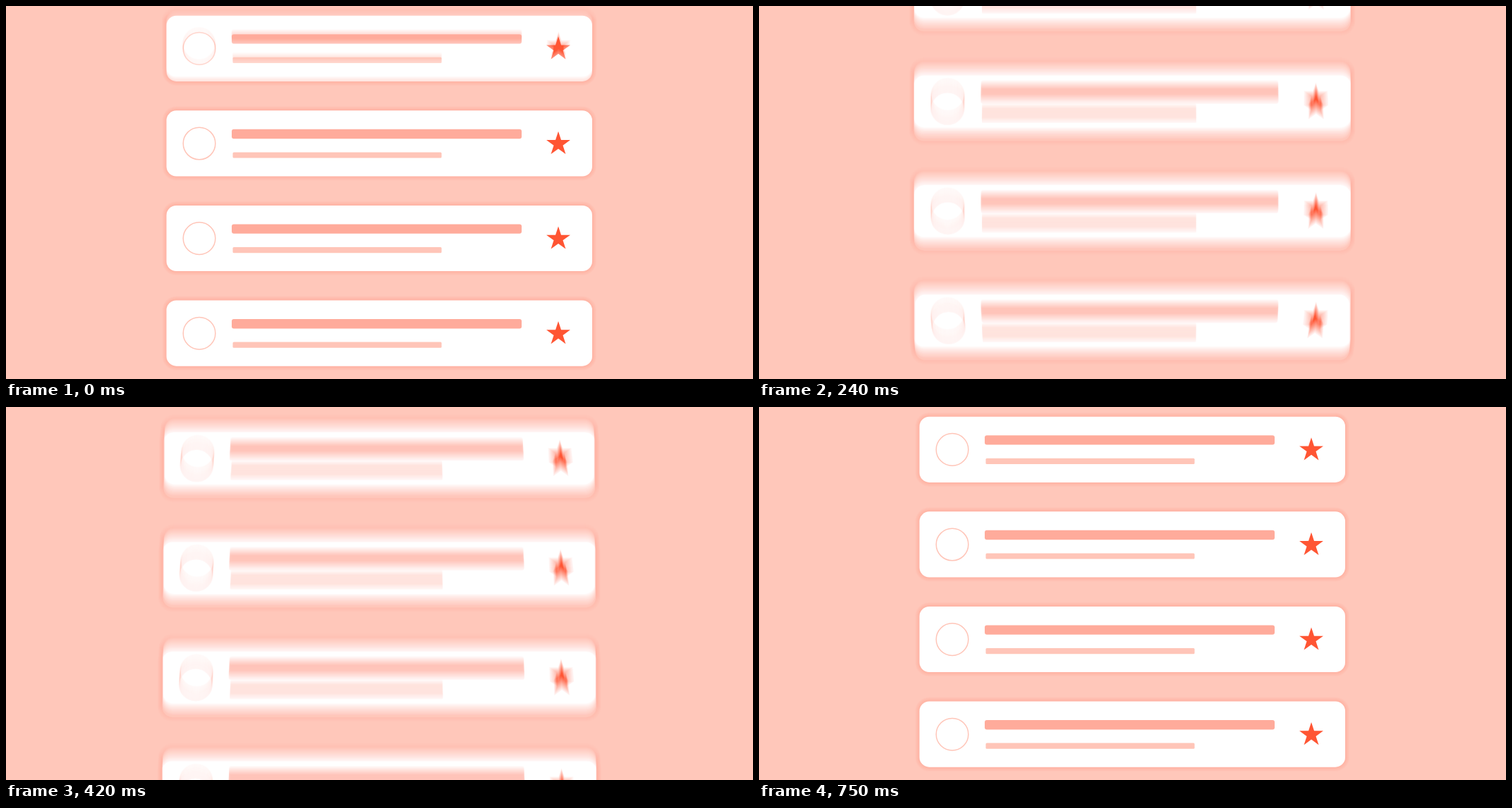
An HTML page with a canvas that plays this animation: 1059 px wide and 529 px high, repeating every 1320 ms.

```html
<!DOCTYPE html>
<html lang="en">
<head>
<meta charset="utf-8">
<title>Staggered list</title>
<style>
  html, body { margin: 0; width: 100%; height: 100%; overflow: hidden; background: #ffc7ba; }
  canvas { display: block; }
</style>
</head>
<body>
<canvas id="stage" width="1059" height="529"></canvas>
<script>
const W = 1059, H = 529, MID = 529.3;
const LOOP = 1320, STEP = 30, LAST = 750;
const PITCH = 134.6, TRAVEL = 388, STAGGER = 60;
const SHUTTER = 60, SAMPLES = 21;
const STRETCH = 0.0265;

const stage = document.getElementById('stage').getContext('2d');
const layer = document.createElement('canvas');
layer.width = W;
layer.height = H;
const pen = layer.getContext('2d');

const clamp = x => Math.min(1, Math.max(0, x));
const progress = (t, from, to) => clamp((t - from) / (to - from));
const ease = x => (1 - Math.cos(Math.PI * x)) / 2;

function box(x, y, w, h, r, color) {
  pen.fillStyle = color;
  pen.beginPath();
  pen.roundRect(x, y, w, h, r);
  pen.fill();
}

function star(x, y, radius) {
  pen.fillStyle = '#ff5533';
  pen.beginPath();
  for (let k = 0; k < 10; k++) {
    const r = k % 2 ? radius * 0.382 : radius;
    const a = k * Math.PI / 5;
    pen.lineTo(x + r * Math.sin(a), y - r * Math.cos(a));
  }
  pen.fill();
}

function card() {
  // soft shadow built from nested boxes
  for (let d = 6; d > 0; d--) {
    box(227.5 - d, 13.7 - d, 603.5 + 2 * d, 93.2 + 2 * d, 14 + d, 'rgba(255,120,96,.045)');
  }
  box(227.5, 13.7, 603.5, 93.2, 14, '#fff');
  pen.strokeStyle = '#ffc5b8';
  pen.lineWidth = 1.5;
  pen.beginPath();
  pen.arc(274, 60.4, 22.8, 0, 2 * Math.PI);
  pen.stroke();
  box(320, 40.2, 411, 13.4, 3, '#ffab9b');
  box(321.5, 72.8, 296, 8.2, 1.5, '#ffc5b8');
  star(783, 61, 17.8);
}

function scene(t) {
  pen.setTransform(1, 0, 0, 1, 0, 0);
  pen.fillStyle = '#ffc7ba';
  pen.fillRect(0, 0, W, H);
  for (let i = 0; i < 5; i++) {
    const start = 8 + STAGGER * i;
    const y = PITCH * (i - progress(t, start, start + TRAVEL));
    const rise = ease(progress(t, 30 * i, 30 * i + 180));
    const fall = ease(progress(t, 205 + 10 * i, 527 + STAGGER * i));
    const sx = 1 + STRETCH * rise * (1 - fall);
    pen.setTransform(sx, 0, 0, 1, MID * (1 - sx), y);
    card();
  }
}

// Average several moments inside the shutter for motion blur
function render(t) {
  const count = t < LAST ? SAMPLES : 1;
  for (let k = 0; k < count; k++) {
    scene(t + ((k + 0.5) / count - 0.5) * SHUTTER);
    stage.globalAlpha = 1 / (k + 1);
    stage.drawImage(layer, 0, 0);
  }
}

const origin = performance.now();
let shown = -1;
function tick() {
  const time = (performance.now() - origin) % LOOP;
  const t = Math.min(LAST, Math.floor(time / STEP) * STEP);
  if (t !== shown) render(shown = t);
  requestAnimationFrame(tick);
}
tick();
</script>
</body>
</html>
```
